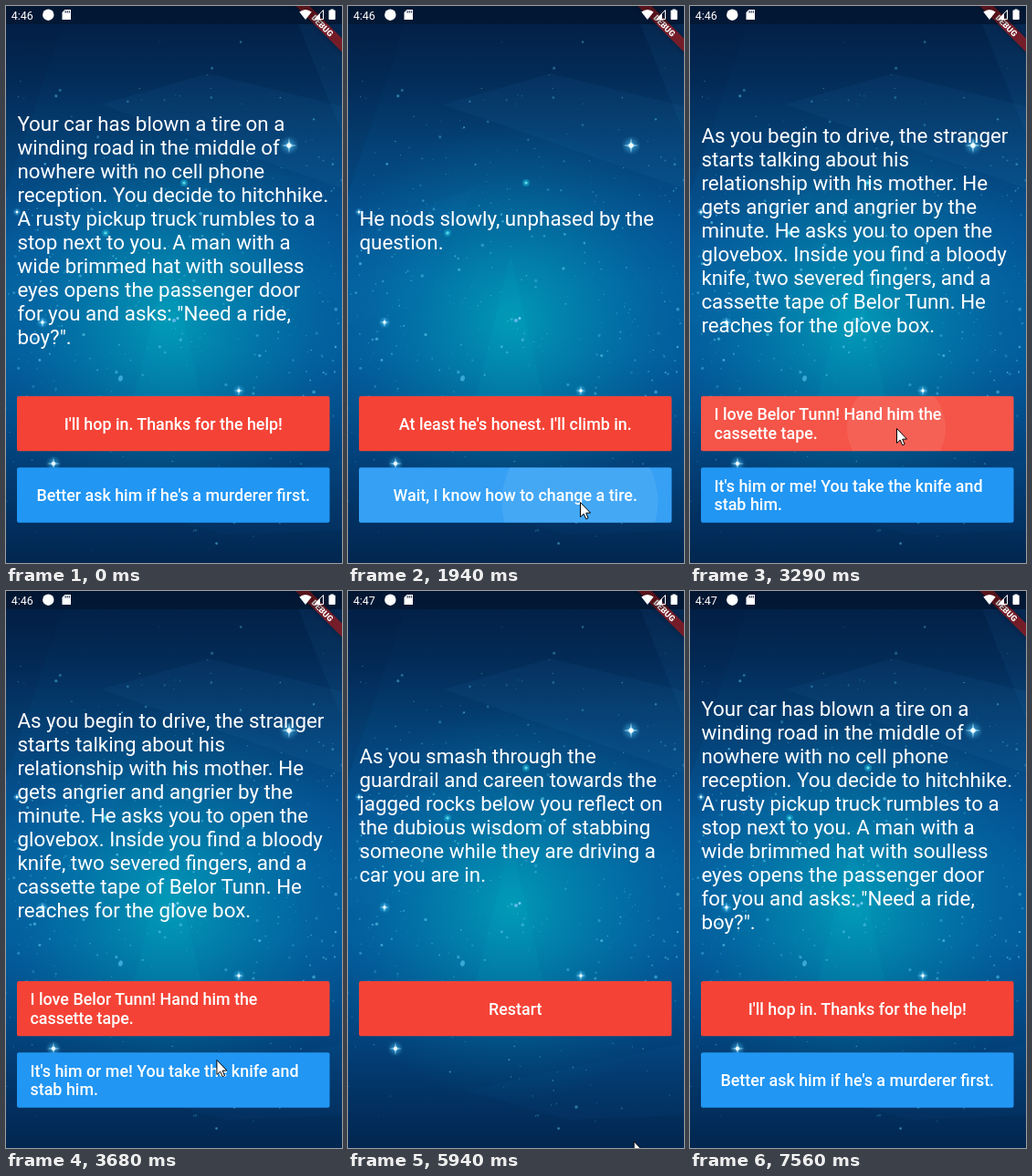
Recreate the animation shown at these times as an HTML page with a canvas. Size 368x611 px, loop 9.27 s.

```html
<!DOCTYPE html>
<html lang="en">
<head>
<meta charset="utf-8">
<title>Hitchhike story</title>
<style>
  html, body { margin: 0; width: 100%; height: 100%; overflow: hidden; background: #021c46; }
  body { position: relative; color: #fff; font-family: Roboto, Arial, sans-serif; }
  canvas { position: absolute; left: 0; top: 0; width: 368px; height: 611px; }
  .text { position: absolute; display: flex; align-items: center; white-space: pre; }
  #story { left: 12.4px; top: 64px; height: 364px; font-size: 22.36px; line-height: 26px; }
  .label { left: 12px; width: 342.5px; height: 60.6px; box-sizing: border-box; padding: 0 14.5px;
           font-size: 17.89px; line-height: 20.96px; font-weight: 500; }
  #first { top: 428.8px; }
  #second { top: 507.2px; }
  #clock { left: 5.8px; top: 0; height: 20px; font-size: 12.5px; }
</style>
</head>
<body>
<canvas id="base" width="368" height="611"></canvas>
<div id="clock" class="text"></div>
<div id="story" class="text"></div>
<div id="first" class="text label"></div>
<div id="second" class="text label"></div>
<canvas id="top" width="368" height="611"></canvas>
<script>
const W = 368, H = 611, LOOP = 9270;
const $ = id => document.getElementById(id);
const base = $('base').getContext('2d');
const top2d = $('top').getContext('2d');

const intro = {
  story: `Your car has blown a tire on a
winding road in the middle of
nowhere with no cell phone
reception. You decide to hitchhike.
A rusty pickup truck rumbles to a
stop next to you. A man with a
wide brimmed hat with soulless
eyes opens the passenger door
for you and asks: "Need a ride,
boy?".`,
  first: "I'll hop in. Thanks for the help!",
  second: "Better ask him if he's a murderer first."
};
const nod = {
  story: 'He nods slowly, unphased by the\nquestion.',
  first: "At least he's honest. I'll climb in.",
  second: 'Wait, I know how to change a tire.'
};
const drive = {
  story: `As you begin to drive, the stranger
starts talking about his
relationship with his mother. He
gets angrier and angrier by the
minute. He asks you to open the
glovebox. Inside you find a bloody
knife, two severed fingers, and a
cassette tape of Belor Tunn. He
reaches for the glove box.`,
  first: 'I love Belor Tunn! Hand him the\ncassette tape.',
  second: "It's him or me! You take the knife and\nstab him."
};
const crash = {
  story: `As you smash through the
guardrail and careen towards the
jagged rocks below you reflect on
the dubious wisdom of stabbing
someone while they are driving a
car you are in.`,
  first: 'Restart',
  second: ''
};

const buttons = [
  { y: 428, h: 60.3, color: '#f44336' },
  { y: 506.2, h: 60.6, color: '#2196f3' }
];

// Taps: time, pressed button, page shown afterwards
const taps = [
  { at: 1700, button: 1, next: nod },
  { at: 3130, button: 0, next: drive },
  { at: 4750, button: 1, next: crash },
  { at: 6720, button: 0, next: intro }
];

// Stages of one tap, by time since it began
const stages = [
  { at: 0, dot: true, radius: 8, glow: 0.05, splash: 0.05 },
  { at: 80, dot: true, radius: 25, glow: 0.09, splash: 0.08 },
  { at: 150, radius: 54, glow: 0.09, splash: 0.08 },
  { at: 240, radius: 85.5, glow: 0.09, splash: 0.08 },
  { at: 340, radius: 108, glow: 0.04, splash: 0.03 },
  { at: 410, radius: 0, glow: 0, splash: 0 }
];
const SWAP = 150;

// Pointer moves: quadratic curves, sampled in steps
const moves = [
  { t0: 380, t1: 850, n: 7, from: [303, 612], to: [254, 544] },
  { t0: 2280, t1: 2750, n: 7, from: [254, 544], to: [226, 463] },
  { t0: 3600, t1: 3990, n: 6, from: [226, 463], via: [227, 543], to: [251, 543] },
  { t0: 4060, t1: 4140, n: 2, from: [251, 543], to: [257.5, 543] },
  { t0: 5320, t1: 5690, n: 6, from: [257.5, 543], to: [316, 616] },
  { t0: 5940, t1: 6400, n: 7, from: [309, 633], to: [330, 463] },
  { t0: 7100, t1: 7560, n: 7, from: [330, 463], to: [338, 620] }
];

function pointerAt(t) {
  const m = moves.filter(v => t >= v.t0).pop();
  if (!m) return [W, H + 30];
  const step = Math.floor((t - m.t0) / (m.t1 - m.t0) * (m.n - 1) + 0.01) + 1;
  const p = Math.min(1, step / m.n);
  const u = 1 - Math.pow(1 - p, 1.25);
  return m.from.map((a, i) => {
    const b = m.to[i], c = m.via ? m.via[i] : (a + b) / 2;
    return (1 - u) ** 2 * a + 2 * u * (1 - u) * c + u * u * b;
  });
}

function seeded(seed) {
  return () => (seed = seed * 16807 % 2147483647) / 2147483647;
}

function poly(g, points, fill) {
  g.beginPath();
  points.forEach(([x, y]) => g.lineTo(x, y));
  g.closePath();
  if (fill) {
    g.fillStyle = fill;
    g.fill();
  }
}

function disc(g, x, y, r, fill) {
  g.beginPath();
  g.arc(x, y, r, 0, 7);
  g.fillStyle = fill;
  g.fill();
}

function glow(g, x, y, r, rgb, alpha) {
  const grad = g.createRadialGradient(x, y, 0, x, y, r);
  for (let i = 0; i <= 4; i++) {
    const k = i / 4;
    grad.addColorStop(k, `rgba(${rgb},${alpha * (1 - k) ** 1.4})`);
  }
  g.fillStyle = grad;
  g.fillRect(x - r, y - r, 2 * r, 2 * r);
}

function flare(g, x, y, r) {
  glow(g, x, y, r, '80,200,255', 0.8);
  const a = r * 0.8, b = r * 0.12;
  for (const [dx, dy] of [[a, b], [b, a]]) {
    poly(g, [[x - dx, y], [x, y - dy], [x + dx, y], [x, y + dy]], 'rgba(180,235,255,.8)');
  }
  disc(g, x, y, r * 0.24, '#effcff');
}

function facets(g) {
  const light = 'rgba(50,150,210,.06)', dark = 'rgba(0,20,60,.1)';
  poly(g, [[104, 108], [222, 74], [368, 110], [368, 200]], light);
  poly(g, [[320, 20], [368, 20], [368, 140]], light);
  poly(g, [[62, 20], [0, 205], [0, 20]], dark);
  poly(g, [[0, 250], [140, 200], [70, 330], [0, 350]], 'rgba(50,150,210,.035)');
  poly(g, [[178, 272], [214, 428], [140, 428]], 'rgba(0,200,215,.06)');
  poly(g, [[130, 548], [368, 496], [368, 575], [240, 580]], 'rgba(50,150,210,.035)');
}

function stars(g) {
  const rnd = seeded(4271);
  for (let i = 0; i < 430; i++) {
    const x = W * rnd() ** 1.1, y = 25 + (rnd() + rnd()) / 2 * 586;
    const r = 0.5 + rnd() ** 3 * 1.4;
    disc(g, x, y, r, `rgba(85,195,232,${0.2 + rnd() * 0.5})`);
  }
  for (const [x, y] of [[195, 194], [109, 249]]) {
    disc(g, x, y, 4, 'rgba(20,160,200,.6)');
    disc(g, x, y, 1.8, 'rgba(100,225,240,.85)');
  }
  g.beginPath();
  g.ellipse(125.5, 408.5, 2.4, 3.2, 0.2, 0, 7);
  g.fillStyle = 'rgba(75,185,230,.75)';
  g.fill();
  disc(g, 184, 345, 2, 'rgba(120,190,250,.8)');
  disc(g, 188, 342.5, 1.5, 'rgba(150,215,255,.8)');
  flare(g, 310, 153, 11);
  flare(g, 40, 347, 7);
  flare(g, 52, 502, 9);
  flare(g, 255, 422, 7);
  flare(g, 12, 226, 5);
}

function banner(g) {
  g.save();
  g.translate(368, 0);
  g.rotate(Math.PI / 4);
  g.scale(0.8945, 0.8945);
  g.shadowColor = 'rgba(0,0,0,.5)';
  g.shadowBlur = 6;
  g.fillStyle = 'rgba(183,28,28,.63)';
  g.fillRect(-45, 28, 90, 12);
  g.shadowBlur = 0;
  g.fillStyle = '#fff';
  g.font = '900 10.2px Roboto, Arial, sans-serif';
  g.textAlign = 'center';
  g.fillText('DEBUG', 0, 37.6);
  g.restore();
}

function statusIcons(g) {
  const white = '#fff';
  disc(g, 46.3, 9.7, 6.2, white);
  poly(g, [[64.5, 4], [71, 4], [71, 15], [61.5, 15], [61.5, 7]], white);
  g.fillStyle = '#03163a';
  for (const x of [64.6, 66.7, 68.8]) g.fillRect(x, 5.2, 1, 2.4);

  g.beginPath();
  g.moveTo(328, 15);
  g.lineTo(321.3, 6.6);
  g.quadraticCurveTo(328, 1.6, 334.7, 6.6);
  g.closePath();
  g.fillStyle = white;
  g.fill();

  poly(g, [[347.5, 4.5], [347.5, 14.5], [338, 14.5]]);
  g.strokeStyle = white;
  g.lineWidth = 1;
  g.stroke();
  poly(g, [[344, 8], [344, 15], [337.5, 15]], white);

  g.fillRect(355.5, 3.5, 3.2, 2);
  g.beginPath();
  g.roundRect(353.5, 4.6, 7.2, 10.4, 0.8);
  g.fill();
}

function makeBackdrop() {
  const c = document.createElement('canvas');
  c.width = W;
  c.height = H;
  const g = c.getContext('2d');
  const sky = g.createLinearGradient(0, 0, 0, H);
  ['#021d42', '#032b57', '#044175', '#045190', '#035b9d', '#03599b', '#034b88', '#02376b', '#02264f']
    .forEach((color, i, all) => sky.addColorStop(i / (all.length - 1), color));
  g.fillStyle = sky;
  g.fillRect(0, 0, W, H);
  glow(g, 180, 345, 215, '0,172,190', 0.75);
  facets(g);
  stars(g);
  banner(g);
  g.fillStyle = 'rgba(0,0,0,.25)';
  g.fillRect(0, 0, W, 20);
  statusIcons(g);
  return c;
}

function drawButton(b, ink, x, y) {
  base.save();
  base.beginPath();
  base.roundRect(12, b.y, 342.5, b.h, 2);
  base.fillStyle = b.color;
  base.fill();
  if (ink) {
    base.clip();
    base.fillStyle = `rgba(255,255,255,${ink.glow})`;
    base.fillRect(0, b.y, W, b.h);
    disc(base, x, y, ink.radius, `rgba(255,255,255,${ink.splash})`);
  }
  base.restore();
}

function drawPointer(x, y) {
  top2d.save();
  top2d.translate(x + 0.5, y + 0.5);
  poly(top2d, [[0, 0], [0, 16], [3.7, 12.6], [6.2, 18.2], [8.6, 17.2], [6.2, 11.7], [11, 11.5]], '#fff');
  top2d.strokeStyle = '#000';
  top2d.lineWidth = 1;
  top2d.stroke();
  top2d.restore();
}

function setText(id, text) {
  const el = $(id);
  if (el.textContent === text) return;
  el.textContent = text;
  if (el.classList.contains('label')) {
    el.style.justifyContent = text.includes('\n') ? 'flex-start' : 'center';
  }
}

const backdrop = makeBackdrop();

function render(t) {
  const swapped = taps.filter(v => t >= v.at + SWAP).pop();
  const page = swapped ? swapped.next : intro;
  const tap = taps.filter(v => t >= v.at).pop();
  const ink = tap && stages.filter(s => t - tap.at >= s.at).pop();
  const [x, y] = pointerAt(t);

  base.drawImage(backdrop, 0, 0);
  buttons.forEach((b, i) => {
    if (i === 0 || page.second) drawButton(b, tap && tap.button === i && ink, x, y);
  });
  for (const id of ['story', 'first', 'second']) setText(id, page[id]);
  setText('clock', t < 5150 ? '4:46' : '4:47');

  top2d.clearRect(0, 0, W, H);
  drawPointer(x, y);
  if (ink && ink.dot) disc(top2d, x, y + 0.5, 12, 'rgba(255,240,20,.56)');
}

const start = performance.now();
function tick() {
  render((performance.now() - start) % LOOP);
  requestAnimationFrame(tick);
}
tick();
</script>
</body>
</html>
```
